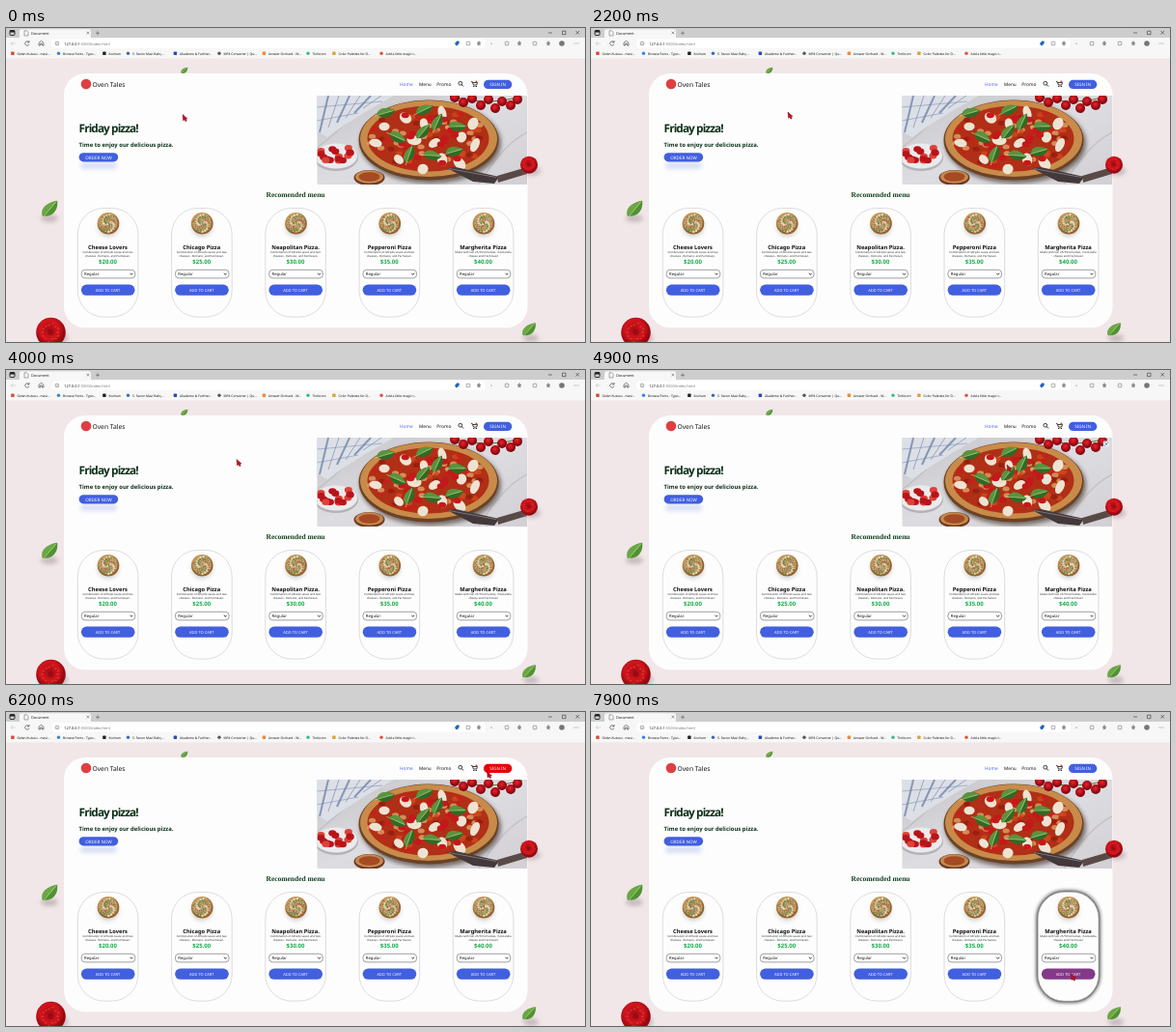
An HTML page for the animation above (8 s loop, 600x325 px).

```html
<!DOCTYPE html>
<html lang="en">
<head>
<meta charset="utf-8">
<title>Pizza menu</title>
<style>
html, body { margin: 0; width: 100%; height: 100%; overflow: hidden; background: #f1e6e8; }
svg { display: block; width: 600px; height: 325px; }
text { font-family: "Noto Sans", "Open Sans", sans-serif; text-rendering: geometricPrecision; }
.serif { font-family: "Liberation Serif", "Noto Serif", serif; }
</style>
</head>
<body>
<svg id="stage" viewBox="0 0 600 325" xmlns="http://www.w3.org/2000/svg"></svg>
<script>
const LOOP = 8000, STEP = 100;
const BLUE = [65, 95, 222], RED = [230, 0, 8];
const INK = '#151515', PAPER = '#fdfdfe', blue = `rgb(${BLUE})`;

let seed = 11;
const rand = () => (seed = (seed * 16807) % 2147483647) / 2147483647;

const attrs = o => Object.entries(o).map(([k, v]) => ` ${k}="${v}"`).join('');
const el = (tag, o, inner = '') => `<${tag}${attrs(o)}>${inner}</${tag}>`;
const rect = (x, y, width, height, fill, rx = 0, o = {}) =>
  el('rect', { x, y, width, height, fill, rx, ...o });
const circle = (cx, cy, r, fill, o = {}) => el('circle', { cx, cy, r, fill, ...o });
const ellipse = (cx, cy, rx, ry, fill, o = {}) => el('ellipse', { cx, cy, rx, ry, fill, ...o });
const path = (d, fill, o = {}) => el('path', { d, fill, ...o });
const line = (d, stroke, width = 0.6, o = {}) =>
  path(d, 'none', { stroke, 'stroke-width': width, ...o });
const text = (x, y, size, str, fill = INK, weight = 400, o = {}) =>
  el('text', { x, y, 'font-size': size, fill, 'font-weight': weight, ...o },
    str.replace(/&/g, '&amp;'));
const mid = { 'text-anchor': 'middle' };

const leaf = (x, y, scale, turn = 0, fill = '#4f9232') =>
  el('g', { transform: `translate(${x} ${y}) rotate(${turn}) scale(${scale})` },
    path('M-9 5C-10 -4 0 -8 10 -7C9 2 2 9 -9 5Z', fill) +
    path('M-9 5Q0 1 10 -7C3 -7 -5 -6 -8 -1Z', '#86bb55', { opacity: 0.5 }) +
    line('M-11 8Q-3 2 8 -6', '#c0d892', 0.7));

function defs() {
  const blur = (id, n) =>
    el('filter', { id, x: '-50%', y: '-50%', width: '200%', height: '200%' },
      `<feGaussianBlur stdDeviation="${n}"/>`);
  const radial = (id, ...stops) =>
    el('radialGradient', { id, cx: 0.45, cy: 0.4 },
      stops.map(([offset, c]) => el('stop', { offset, 'stop-color': c })).join(''));
  return el('defs', {}, blur('soft', 2.2) + blur('glow', 2.2) +
    radial('tomato', [0, '#e0292c'], [0.6, '#b80d18'], [1, '#7d0710']) +
    radial('slice', [0, '#a80c16'], [0.65, '#d3151c'], [1, '#960911']) +
    radial('crust', [0, '#c9a468'], [0.8, '#c3924c'], [1, '#94632c']) +
    el('linearGradient', { id: 'marble', x1: 0, y1: 0, x2: 1, y2: 1 },
      '<stop offset="0" stop-color="#c4c3c8"/><stop offset=".5" stop-color="#dddce0"/>' +
      '<stop offset="1" stop-color="#d2d0d4"/>') +
    el('clipPath', { id: 'photo' }, rect(322.5, 70, 217.5, 92, '#000')));
}

function browser() {
  const marks = [
    [6, 'Gelen Kutusu - mavi...', '#d94a3c'], [53.5, 'Browse Fonts - Typo...', '#3d7fe0'],
    [101, 'Kodrum', '#222'], [125.5, '5. Sezon Mavi Bahç...', '#3c67b8'],
    [174.5, 'Akademo & Further...', '#2e4bb0'], [220, 'MP4 Converter | Qu...', '#555'],
    [266.5, 'Answer Orchard - W...', '#ee8b3a'], [312, 'Tintloom', '#3db88f'],
    [339, 'Color Palettes for D...', '#d9a33c'], [388, 'Add a little magic t...', '#e0503c']];
  const tools = [479, 490, 519, 532, 548, 562];
  const stroke = '#555';
  return rect(0, 0, 600, 10.5, '#cdcdcd') + rect(0, 10, 600, 21.5, '#f7f7f7') +
    rect(4, 2.5, 5, 5, 'none', 1, { stroke: '#222', 'stroke-width': 0.9 }) + rect(4, 2.5, 5, 2, '#222') +
    path('M14 10.5V3Q14 1.2 16 1.2H86Q88 1.2 88 3V10.5Z', '#f7f7f7') +
    line('M19 2.8H21.5L23 4.3V8H19Z', stroke, 0.5) + text(26, 6.6, 3.8, 'Document', '#222') +
    line('M83.5 3.6L86.3 6.4M86.3 3.6L83.5 6.4M95 3.3V7.3M93 5.3H97', '#444', 0.5) +
    line('M562 5H566M576.5 3.2H580V6.7H576.5ZM590.5 3L594 6.5M594 3L590.5 6.5', '#333', 0.6) +
    line('M10 16H5M7 14L5 16L7 18', '#c2c2c2', 0.6) +
    line('M23.6 14.5A2.2 2.2 0 1 0 24 16.8M24 13V15H22', '#333', 0.6) +
    line('M34 18V15.3L36.5 13.3L39 15.3V18H37.3V16H35.7V18Z', '#333', 0.6) +
    rect(47.5, 11.6, 449, 8.8, '#fff', 2.5) +
    circle(53, 16, 1.9, 'none', { stroke, 'stroke-width': 0.5 }) + line('M53 15.5V17', stroke, 0.5) +
    text(60.3, 17.5, 3.9, '127.0.0.1<tspan fill="#777">:5500/index.html</tspan>', '#111') +
    path('M465 16L467.5 13.3L470 14L469 17L466.5 18.5Z', '#1f66c4') + circle(503, 16, 0.6, stroke) +
    tools.map((x, i) => i % 2
      ? line(`M${x - 2} 15.3H${x + 2}L${x - 1.2} 18L${x} 13.5L${x + 1.2} 18Z`, stroke, 0.5)
      : rect(x - 1.8, 14.2, 3.6, 3.6, 'none', 0.7, { stroke, 'stroke-width': 0.5 })).join('') +
    circle(576, 16, 2.8, '#777577') +
    [589, 591, 593].map(x => circle(x, 16, 0.45, '#444')).join('') +
    marks.map(([x, name, c], i) =>
      (i % 2 ? circle(x + 1, 26.3, 1.7, c) : rect(x - 0.8, 24.6, 3.4, 3.4, c, 0.6)) +
      text(x + 5.5, 27.5, 3.35, name, '#111')).join('');
}

const shade = (x, y, rx, ry) =>
  ellipse(x, y, rx, ry, '#8a7a80', { opacity: 0.4, filter: 'url(#soft)' });

function tomatoSlice(x, y, r) {
  let s = circle(x, y, r, 'url(#slice)');
  for (let i = 0; i < 14; i++) {
    const a = i * 0.449, d = r * (0.45 + rand() * 0.25);
    s += ellipse(x + Math.cos(a) * d, y + Math.sin(a) * d, r * 0.085, r * 0.06, '#e8463a', { opacity: 0.6 });
  }
  return s + circle(x, y, r * 0.2, '#7d0710', { opacity: 0.5 });
}

function scenery() {
  return leaf(184.8, 44.2, 0.4, -10) + shade(45, 197, 9, 4) + leaf(45.3, 187.8, 0.98, -14) +
    shade(544, 321, 8, 4) + leaf(542, 312.5, 0.82, -12) +
    shade(49, 321, 15, 8) + tomatoSlice(46.5, 315, 15.3);
}

function photo() {
  const cheese = [[392, 102], [414, 93], [452, 88], [472, 113], [444, 119], [423, 116], [407, 136],
    [452, 136], [486, 121], [432, 146], [383, 119], [470, 140], [433, 99], [484, 99]];
  const basil = [[393, 88, 20], [433, 85, 10], [467, 102, 35], [447, 98, -30], [405, 113, 60],
    [432, 108, -15], [464, 128, 20], [418, 131, -35], [441, 132, 40]];
  const vine = [[465, 72], [474, 77], [483, 73], [492, 80], [500, 74], [507, 83], [514, 76], [523, 80], [530, 74]];
  let s = rect(322, 70, 218, 92, 'url(#marble)');
  s += line('M322 124Q360 96 372 70M490 162Q515 120 540 108', '#b3b1b8', 1.2, { opacity: 0.6 });

  s += path('M322 70H402L374 86L350 101L333 113L322 107Z', '#dcdfe6');
  for (let i = 0; i < 6; i++)
    s += line(`M${334 + i * 11} 70L${325 + i * 9} ${108 - i * 5}`, '#6479a0', i % 2 ? 0.8 : 2, { opacity: 0.7 });
  s += line('M322 82L390 76M322 96L365 88', '#7186ad', 1.2, { opacity: 0.5 });

  s += ellipse(342, 134, 23, 14, '#b5b3b8') + ellipse(342, 132.5, 22, 13, '#ebeaec');
  for (let i = 0; i < 16; i++)
    s += ellipse(342 + (rand() - 0.5) * 32, 132 + (rand() - 0.5) * 16, 4, 3.2, i % 3 ? '#b8141a' : '#dc4238');
  s += ellipse(376.5, 155, 16, 8, '#6d3a1f') + ellipse(376.5, 154, 14.5, 6.8, '#c58a51') +
    ellipse(376.5, 154, 11, 4.8, '#a54a22');

  s += ellipse(440, 119, 73, 42, '#544843', { opacity: 0.75, filter: 'url(#soft)' }) +
    ellipse(438, 116, 72.5, 41.5, '#6b4226') + ellipse(438, 114.5, 71, 39.5, '#c98b4a') +
    ellipse(437.5, 114.5, 63, 34, '#b02f16');
  for (let i = 0; i < 80; i++) {
    const a = rand() * 6.283, r = Math.sqrt(rand());
    s += ellipse(437 + Math.cos(a) * r * 60, 114.5 + Math.sin(a) * r * 32, 3.6, 2.5,
      ['#d14a1d', '#941c10', '#dca468', '#c8201a'][i % 4], { opacity: 0.8 });
  }
  cheese.forEach(([x, y], i) => {
    s += ellipse(x, y, 5.6 + i % 3, 4.2 + i % 2, '#eee3d2', { transform: `rotate(${i * 37} ${x} ${y})` });
  });
  for (let i = 0; i < 18; i++) {
    const a = i * 2.4, r = 0.3 + (i % 4) * 0.18;
    s += ellipse(437 + Math.cos(a) * r * 60, 114 + Math.sin(a) * r * 32, 4, 3, '#c4181a');
  }
  basil.forEach(([x, y, turn]) => s += leaf(x, y, 0.86, turn, '#2f6a26'));

  s += line('M460 70Q495 82 535 71', '#55792f', 1);
  vine.forEach(([x, y]) => s += circle(x, y, 5, 'url(#tomato)'));
  s += path('M457 145L466 144L511 154L506 161L484 159Z', '#43383a') +
    line('M459 145.5L508 154.5', '#958f92', 0.7) +
    path('M509 153L540 144V151L510 160Z', '#5a4a47');
  return el('g', { 'clip-path': 'url(#photo)' }, s);
}

function header() {
  return circle(83, 58, 5.3, '#df3f42') + text(89.5, 60.6, 6.7, 'Oven Tales', INK, 500) +
    text(408, 60, 4.8, 'Home', '#5368e8', 500) + text(428, 60, 4.7, 'Menu', INK, 500) +
    text(446.3, 60, 4.8, 'Promo', INK, 500) +
    circle(470.8, 57.2, 1.9, 'none', { stroke: INK, 'stroke-width': 0.8 }) +
    line('M472.2 58.6L474 60.5', INK, 0.9) +
    line('M482 55.6H483.3L484.4 59H487.7L488.5 56.5H483.8', INK, 0.8) +
    circle(484.8, 60.4, 0.7, INK) + circle(487.3, 60.4, 0.7, INK) + circle(487.4, 55.4, 1, '#e0392f') +
    rect(495, 53.8, 29.3, 9.2, blue, 4.6, { id: 'sign' }) +
    text(509.6, 60.1, 4.5, 'SIGN IN', '#fff', 500, mid) +
    text(75.6, 107.6, 11.8, 'Friday pizza!', '#0d3018', 700, { 'letter-spacing': -0.9 }) +
    text(75.6, 123, 5.95, 'Time to enjoy our delicious pizza.', '#0d3018', 600) +
    rect(77, 139, 38, 7, '#8a9be0', 4, { opacity: 0.3, filter: 'url(#soft)' }) +
    rect(75.6, 129.2, 40.6, 9.2, blue, 4.6) +
    text(96, 135.5, 4.6, 'ORDER NOW', '#fff', 500, mid) +
    text(300, 175.2, 7.5, 'Recomended menu', '#12401f', 700, { ...mid, class: 'serif' });
}

function smallPizza(cx, cy) {
  let s = ellipse(cx, cy + 3.5, 11, 10.5, '#777', { opacity: 0.3, filter: 'url(#soft)' }) +
    circle(cx, cy, 11.3, 'url(#crust)') + circle(cx, cy, 9.4, '#c4aa7c');
  for (let i = 0; i < 60; i++) {
    const a = i * 2.4, r = Math.sqrt(i / 60) * 9.4;
    s += circle(cx + Math.cos(a) * r, cy + Math.sin(a) * r, 0.5 + rand() * 0.7,
      ['#72803f', '#e4d9b6', '#b0643c', '#8b7d4b'][i % 4]);
  }
  return s;
}

function card([name, price], i) {
  const cx = 105.5 + i * 97.25, last = i === 4;
  const box = [cx - 31.2, 186.5, 62.6, 112.6];
  const about = last
    ? ['Made with San 25/70 tomatoes, mozzarella', 'cheese and fresh basil']
    : ['Combination of Alfredo sauce and two', 'cheeses - Romano, and Parmesan.'];
  const halo = { id: 'halo', opacity: 0, filter: 'url(#glow)', stroke: '#000', 'stroke-width': 2 };
  return (last ? rect(...box, '#000', 27, halo) : '') +
    rect(...box, PAPER, 27, { stroke: '#cfcfd3', 'stroke-width': 0.7 }) +
    smallPizza(cx + 0.5, 202.2) +
    text(cx, 228.7, 5.75, name, '#111', 600, mid) +
    about.map((row, n) => text(cx, 233.3 + n * 3.8, 2.9, row, '#333', 400, mid)).join('') +
    text(cx, 243.7, 6, price, '#10ad43', 600, mid) +
    rect(cx - 27.3, 250.3, 55.6, 8.6, '#fff', 3.6, { stroke: '#777', 'stroke-width': 0.7 }) +
    text(cx - 24.4, 256.1, 4.2, 'Regular') +
    line(`M${cx + 23} 253.8l1.5 1.5l1.5 -1.5`, '#111', 0.8) +
    rect(cx - 27.6, 265.6, 55.6, 11.2, blue, 5.6, last ? { id: 'add' } : {}) +
    text(cx, 272.7, 4, 'ADD TO CART', '#fff', 500, mid);
}

const menu = [['Cheese Lovers', '$20.00'], ['Chicago Pizza', '$25.00'], ['Neapolitan Pizza.', '$30.00'],
  ['Pepperoni Pizza', '$35.00'], ['Margherita Pizza', '$40.00']];

const stage = document.getElementById('stage');
stage.innerHTML = defs() + rect(0, 31.5, 600, 294, '#f1e6e8') + browser() + scenery() +
  rect(60, 47, 480.5, 263.3, PAPER, 22) + photo() + shade(545, 148, 9, 5) + tomatoSlice(542, 141.7, 9) +
  header() + menu.map(card).join('') +
  el('g', { id: 'lens' }, rect(530.8, 73.6, 6, 6, '#e8f0fa', 1.2) +
    line('M532 75.8V74.8H533M534.7 74.8H535.7V75.8M532 77.4V78.4H533', '#3977bd', 0.5) +
    circle(534, 76.7, 0.9, '#3977bd')) +
  el('g', { id: 'cursor' },
    path('M0 0L0.6 6.4L2 5.2L3 7.2L4.2 6.6L3.3 4.7L5 4.4Z', '#c40f1c', { stroke: '#6e0a12', 'stroke-width': 0.45 }));

const [sign, add, halo, lens, cursor] =
  ['sign', 'add', 'halo', 'lens', 'cursor'].map(id => document.getElementById(id));

// time, x, y
const route = [[0, 183, 89.5], [500, 189, 96], [1000, 197, 100], [1600, 201, 93], [2200, 204, 87],
  [3100, 219, 89], [4000, 239, 92.5], [4400, 320, 95], [4900, 431, 98], [5500, 484, 74],
  [5800, 498, 62], [6200, 498.5, 61.5], [6800, 500, 61.5], [7100, 501, 95], [7500, 499, 205],
  [7800, 497.5, 270], [8000, 497.5, 272]];

function pointer(t) {
  const i = route.findIndex(p => p[0] > t);
  const a = route[i - 1], b = route[i], k = (t - a[0]) / (b[0] - a[0]);
  return [1, 2].map(n => a[n] + (b[n] - a[n]) * k);
}
const ramp = (t, from, to) => Math.max(0, Math.min(1, (t - from) / (to - from)));
const mix = k => `rgb(${BLUE.map((c, i) => Math.round(c + (RED[i] - c) * k))})`;

function draw() {
  const t = Math.floor(performance.now() % LOOP / STEP) * STEP;
  const [x, y] = pointer(t);
  cursor.setAttribute('transform', `translate(${x} ${y})`);
  lens.setAttribute('visibility', x > 323 && x < 540 && y > 70 && y < 162 ? 'visible' : 'hidden');
  sign.setAttribute('fill', mix(ramp(t, 5700, 6000) - ramp(t, 6800, 7100)));
  halo.setAttribute('opacity', ramp(t, 7400, 7700));
  add.setAttribute('fill', mix(0.4 * ramp(t, 7700, 7900)));
  requestAnimationFrame(draw);
}
draw();
</script>
</body>
</html>
```
